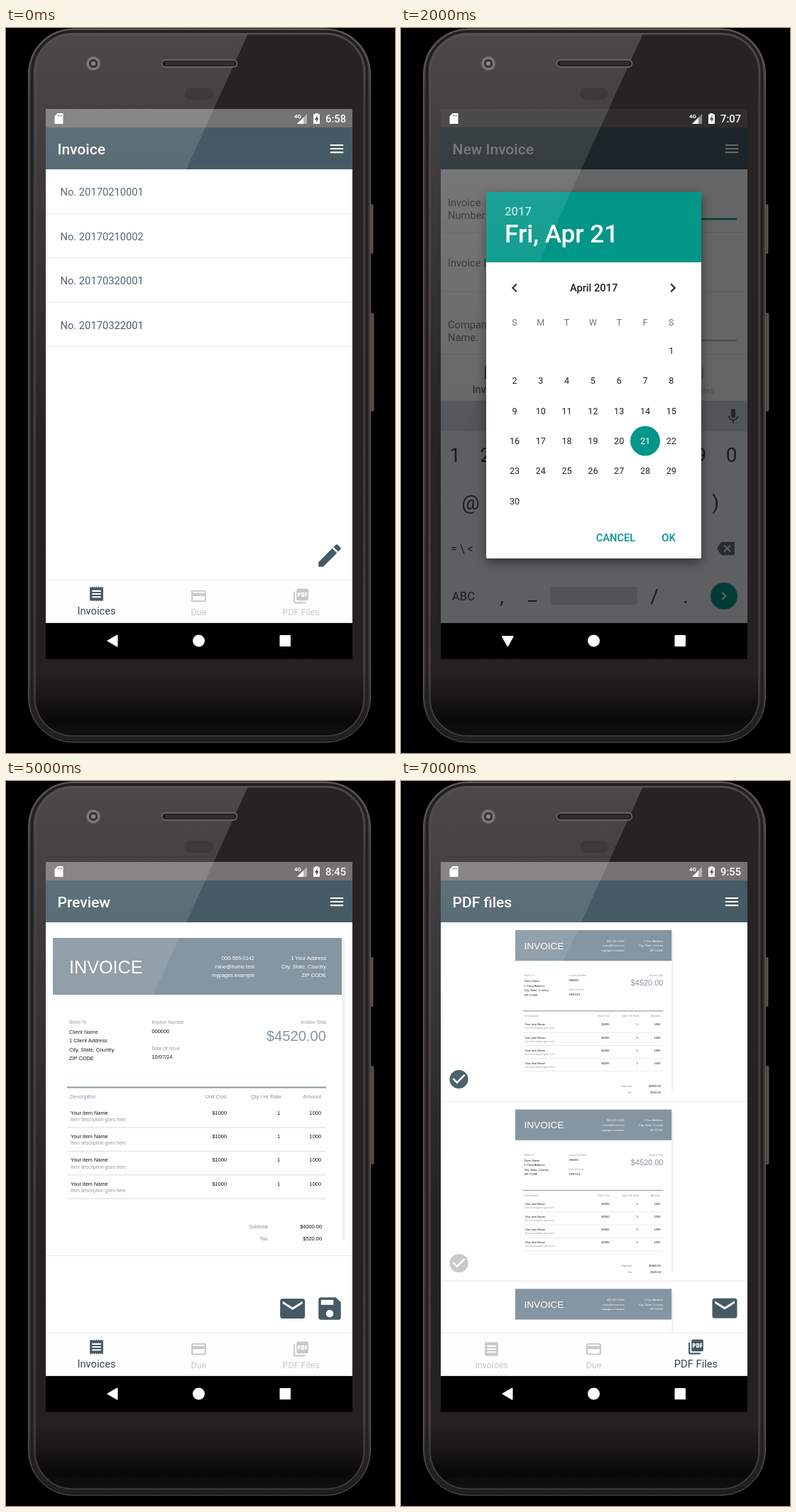
Write an HTML page that moves like this. It is 548 px wide and 1021 px high and loops after 8000 ms.

```html
<!DOCTYPE html>
<html lang="en">
<head>
<meta charset="utf-8">
<title>Invoice app walkthrough</title>
<style>
html, body { margin: 0; width: 100%; height: 100%; overflow: hidden; background: #000; }
svg { display: block; font-family: Roboto, sans-serif; }
.paper { font-family: "Liberation Sans", Arial, sans-serif; }
</style>
</head>
<body>
<svg width="548" height="1021" viewBox="0 0 548 1021">
  <defs>
    <linearGradient id="face" x1="0" y1="0" x2="0" y2="1">
      <stop offset="0" stop-color="#262324"/><stop offset=".91" stop-color="#242122"/>
      <stop offset=".98" stop-color="#0a0909"/><stop offset="1" stop-color="#141212"/>
    </linearGradient>
    <linearGradient id="rim" x1="0" y1="0" x2="0" y2="1">
      <stop offset="0" stop-color="#5d5a58"/><stop offset=".1" stop-color="#3e3b39"/>
      <stop offset=".9" stop-color="#3e3b39"/><stop offset="1" stop-color="#1c1a1a"/>
    </linearGradient>
    <linearGradient id="shine" gradientUnits="userSpaceOnUse" x1="0" y1="8" x2="0" y2="600">
      <stop offset="0" stop-color="#fff" stop-opacity=".17"/>
      <stop offset="1" stop-color="#fff" stop-opacity="0"/>
    </linearGradient>
    <clipPath id="faceClip"><rect x="41" y="9" width="463" height="988" rx="53"/></clipPath>
    <clipPath id="listClip"><rect x="56" y="199" width="432" height="578"/></clipPath>
    <filter id="shadow" x="-20%" y="-20%" width="140%" height="140%">
      <feDropShadow dx="0" dy="6" stdDeviation="8" flood-opacity=".45"/>
    </filter>
  </defs>

  <rect x="511" y="248" width="6.5" height="70" rx="2" fill="#4b4441"/>
  <rect x="511" y="401" width="7.5" height="139" rx="2" fill="#4b4441"/>
  <path d="M516 249v68M517 403v136" stroke="#69605c"/>
  <rect x="31.5" y="1" width="482" height="1005" rx="63" fill="url(#rim)" stroke="#5f5c59"/>
  <rect x="36.5" y="5" width="472" height="996" rx="58" fill="none" stroke="#211f1f" stroke-width="4"/>
  <rect x="41" y="9" width="463" height="988" rx="53" fill="url(#face)" stroke="#454240" stroke-width="1.5"/>
  <rect x="252" y="84" width="40" height="17" rx="8.5" fill="#1b1818"/>
  <g id="screen"></g>
  <path d="M30 9H340.5L41 667H30z" fill="url(#shine)" clip-path="url(#faceClip)" pointer-events="none"/>
  <g id="status"></g>
  <circle cx="123" cy="50" r="10" fill="#757371"/>
  <circle cx="123" cy="50" r="7" fill="#383635" stroke="#9a9896"/>
  <circle cx="123" cy="50" r="3" fill="#8a8886"/>
  <rect x="219.5" y="45" width="106" height="10" rx="5" fill="#1d1b1b" stroke="#777472" stroke-width="1.3"/>
  <path d="M224 48H322M225 50H322M224 52H322" stroke="#625f5d" stroke-dasharray="1.4 1.2"/>
</svg>

<script>
const SLATE = '#455a64', TEAL = '#009688', PALE = '#c9c9c9', LABEL = '#6b6b6b', INK = '#212121', STEEL = '#8595a1';
const BODY = 14.7, VALUE = 18.9;
const ICONS = {
  receipt: 'M18 17H6v-2h12v2zm0-4H6v-2h12v2zm0-4H6V7h12v2zM3 22l1.5-1.5L6 22l1.5-1.5L9 22l1.5-1.5L12 22l1.5-1.5L15 22l1.5-1.5L18 22l1.5-1.5L21 22V2l-1.5 1.5L18 2l-1.5 1.5L15 2l-1.5 1.5L12 2 10.5 3.5 9 2 7.5 3.5 6 2 4.5 3.5 3 2z',
  card: 'M20 4H4a2 2 0 0 0-2 2v12a2 2 0 0 0 2 2h16a2 2 0 0 0 2-2V6a2 2 0 0 0-2-2zm0 14H4v-6h16v6zm0-10H4V6h16v2z',
  pdf: 'M20 2H8a2 2 0 0 0-2 2v12a2 2 0 0 0 2 2h12a2 2 0 0 0 2-2V4a2 2 0 0 0-2-2zm-8.5 7.5A1.5 1.5 0 0 1 10 11H9v2H7.5V7H10a1.5 1.5 0 0 1 1.5 1.5zm5 2A1.5 1.5 0 0 1 15 13h-2.5V7H15a1.5 1.5 0 0 1 1.5 1.5zm4-3H19v1h1.5V11H19v2h-1.5V7h3zM9 9.5h1v-1H9zM4 6H2v14a2 2 0 0 0 2 2h14v-2H4zm10 5.5h1v-3h-1z',
  pencil: 'M3 17.25V21h3.75L17.8 9.94l-3.75-3.75zM20.7 7.04a1 1 0 0 0 0-1.41l-2.34-2.34a1 1 0 0 0-1.41 0l-1.83 1.83 3.75 3.75z',
  menu: 'M3 18h18v-2H3zm0-5h18v-2H3zm0-7v2h18V6z',
  mail: 'M20 4H4a2 2 0 0 0-2 2v12a2 2 0 0 0 2 2h16a2 2 0 0 0 2-2V6a2 2 0 0 0-2-2zm0 4l-8 5-8-5V6l8 5 8-5z',
  save: 'M17 3H5a2 2 0 0 0-2 2v14a2 2 0 0 0 2 2h14a2 2 0 0 0 2-2V7zm-5 16a3 3 0 1 1 0-6 3 3 0 0 1 0 6zm3-10H5V5h10z',
  check: 'M12 2a10 10 0 1 0 0 20 10 10 0 0 0 0-20zm-2 15l-5-5 1.4-1.4 3.6 3.6 7.6-7.6L19 8z',
  left: 'M15.4 7.4L14 6l-6 6 6 6 1.4-1.4-4.6-4.6z',
  right: 'M8.6 7.4L10 6l6 6-6 6-1.4-1.4 4.6-4.6z',
  erase: 'M22 3H7c-.7 0-1.2.35-1.6.9L0 12l5.4 8.1c.4.55.9.9 1.6.9h15a2 2 0 0 0 2-2V5a2 2 0 0 0-2-2zm-3 12.6L17.6 17 14 13.4 10.4 17 9 15.6l3.6-3.6L9 8.4 10.4 7l3.6 3.6L17.6 7 19 8.4 15.4 12z',
  mic: 'M12 14a3 3 0 0 0 3-3V5a3 3 0 0 0-6 0v6a3 3 0 0 0 3 3zm5.3-3a5.3 5.3 0 0 1-10.6 0H5a7 7 0 0 0 6 6.7V21h2v-3.3a7 7 0 0 0 6-6.7z'
};

const rect = (x, y, w, h, fill, extra = '') => `<rect x="${x}" y="${y}" width="${w}" height="${h}" fill="${fill}" ${extra}/>`;
const rule = (y, color = '#e8e8e8', x1 = 56, x2 = 488, h = 1) => rect(x1, y - h / 2, x2 - x1, h, color);
const icon = (name, cx, cy, size, fill) =>
  `<path d="${ICONS[name]}" fill="${fill}" transform="translate(${cx - size / 2} ${cy - size / 2}) scale(${size / 24})"/>`;
const ANCHOR = { l: 'start', m: 'middle', r: 'end' };
const text = (x, y, s, size = BODY, fill = LABEL, align = 'l', weight = 400) =>
  `<text x="${x}" y="${y}" font-size="${size}" fill="${fill}" text-anchor="${ANCHOR[align]}" font-weight="${weight}">${s}</text>`;
const lines = (x, y, gap, list, ...style) => list.map((s, i) => text(x, y + i * gap, s, ...style)).join('');
const times = (n, fn) => Array.from({ length: n }, (_, i) => fn(i)).join('');

const underline = (y, focused) => focused ? rule(y, TEAL, 175, 473, 2.4) : rule(y, '#8f8f8f', 175, 473, 1.2);

function tabs(active, top = 777, shift = 0) {
  const items = [['Invoices', 'receipt'], ['Due', 'card'], ['PDF Files', 'pdf']];
  return rect(56, top + shift, 432, 838 - top, '#fdfdfd') + rule(top + shift + .5, '#ededed') + rule(837 + shift, '#eee', 56, 488, 2) +
    items.map(([name, glyph], i) => {
      const on = i === active, x = 127.5 + 144 * i, color = on ? SLATE : PALE;
      return icon(glyph, x, (on ? 797 : 800) + shift, 25, color) +
        text(x, (on ? 826 : 827) + shift, name, on ? BODY : 12.6, on ? '#37474f' : color, 'm');
    }).join('');
}

function toolbar(title) {
  return rect(56, 114, 432, 26, '#757273') + rect(56, 140, 432, 59, SLATE) +
    text(72.5, 178, title, 21, '#fff', 'l', 500) + icon('menu', 466, 170, 24.5, '#fff');
}

function statusBar(time) {
  return `<path d="M72.500 120H80.500V135H68.500V124.500z" fill="#fff"/>
    <path d="M73.500 122v2.500m2.300-2.500v2.500m2.300-2.500v2.500" stroke="#777"/>
    ${text(406, 127, '4G', 8, '#fff', 'l', 700)}
    <path d="M424 121V135H410z" fill="#fff" opacity=".45"/><path d="M419 126V135H410z" fill="#fff"/>
    <path d="M435.500 120h4v1.500h2.500V135H433V121.500h2.500z" fill="#fff"/>
    <path d="M438.500 123l-3.500 6h2.200v4l3.300-6h-2z" fill="#555"/>
    ${text(479, 133, time, BODY, '#fff', 'r', 500)}`;
}

function navBar(keyboardOpen) {
  const back = keyboardOpen ? 'M143 857H157.500L150.300 870z' : 'M156.500 855.500V870.500L143.500 863z';
  return rect(56, 838, 432, 50.5, '#000') + `<path d="${back}" fill="#fff" stroke="#fff" stroke-width="2" stroke-linejoin="round"/>
    <circle cx="271.500" cy="863" r="8.500" fill="#fff"/>` + rect(385.5, 855, 15.5, 16, '#fff', 'rx="1"');
}

const invoiceList = () => ['20170210001', '20170210002', '20170320001', '20170322001']
  .map((n, i) => text(76.5, 236.3 + 62.4 * i, 'No. ' + n, BODY, SLATE) + rule(261.5 + 62.3 * i)).join('') +
  icon('pencil', 456, 743, 42, SLATE);

const button = (y, label) => rect(56, y, 432, 42.5, SLATE) + text(271.5, y + 27, label, BODY, '#fff', 'm');

function clientForm(dy, focus) {
  return `<g clip-path="url(#listClip)"><g transform="translate(0 ${dy})">` +
    lines(66, 218, 17.5, ['Invoice', 'Number:']) + text(192, 219, '000000', VALUE, INK) + underline(236, focus === 'number') +
    text(66, 302.5, 'Invoice Date:') + text(192, 302.5, '10/07/14') +
    lines(66, 390, 17.5, ['Company', 'Name:']) + text(192, 390, 'Client Name', VALUE, INK) + underline(407) +
    lines(66, 478, 17.5, ['Company', 'Address:']) +
    lines(192, 478.5, 22.2, ['1, Client Address', 'City, State, Country', 'ZIP CODE'], VALUE, INK) + underline(540) +
    text(66, 607, 'Due Date:') + text(192, 607, 'Due Date') +
    text(66, 694, 'Email Address:') + text(192, 694, 'mine@home.test', VALUE, INK) +
    (focus === 'email' ? rect(334, 674, 2, 25, TEAL) : '') + underline(712, focus === 'email') +
    [254.5, 338, 426.5, 559.5, 642.5].map(y => rule(y)).join('') + button(731, 'Next') + '</g></g>';
}

function itemForm() {
  const rows = [['Description:', 'Your item Name'], ['Quantity:', '1'], ['Unit Price:', '$1000'], ['Amount:', '$1000']];
  return rows.map(([label, value], i) => {
    const y = 88.2 * i;
    return text(66, 251 + y, label) + text(192, 251 + y, value, VALUE, INK) + underline(268.5 + y, i === 3) + rule(287.5 + y);
  }).join('') + button(552, 'Save and Preview');
}

function keyboard() {
  const key = (x, y, s, size = 28) => text(x, y, s, size, '#37474f', 'm');
  return rect(56, 525, 432, 43, '#cfd8dc') + rect(56, 568, 432, 270, '#eceff1') + icon('mic', 468, 547, 25, '#546066') +
    times(10, i => key(76 + 43.3 * i, 611, (i + 1) % 10)) + key(98, 678, '@') + key(443, 678, ')') +
    key(86, 739, '= \\ &lt;', 16) + icon('erase', 457.5, 733, 25, '#607078') + key(88, 806, 'ABC', 16.5) +
    key(142, 810, ',') + key(185, 806, '_') + rect(210, 787, 122.5, 25, '#cbd1d4', 'rx="2"') + key(357, 810, '/') + key(401, 810, '.') +
    `<circle cx="455" cy="800" r="19" fill="${TEAL}"/>` + icon('right', 455, 800, 23, '#fff');
}

function datePicker() {
  const colX = i => 160 + 36.8 * i;
  return `<g filter="url(#shadow)">${rect(120, 231, 303, 516, '#fff', 'rx="2"')}</g>` + rect(120, 231, 303, 99, TEAL) +
    text(146, 264, '2017', 16.8, 'rgba(255,255,255,.7)', 'l', 500) + text(146, 302, 'Fri, Apr 21', 35.2, '#fff', 'l', 500) +
    icon('left', 160, 366, 25, INK) + icon('right', 383, 366, 25, INK) + text(271.7, 371, 'April 2017', BODY, INK, 'm', 500) +
    times(7, i => text(colX(i), 418.500, 'SMTWTFS'[i], 12.6, '#757575', 'm')) +
    `<circle cx="344" cy="581.500" r="21" fill="${TEAL}"/>` +
    times(30, i => text(colX((i + 6) % 7), 459 + 42.3 * Math.floor((i + 6) / 7), i + 1, 12.6, i === 20 ? '#fff' : INK, 'm')) +
    text(302.5, 723, 'CANCEL', BODY, TEAL, 'm', 500) + text(377, 723, 'OK', BODY, TEAL, 'm', 500);
}

function invoicePaper() {
  const S = 7.4, TINY = 6.5, GRAY = '#999', BLACK = '#111';
  const right = (x, y, s, color = BLACK) => text(x, y, s, S, color, 'r');
  return '<g class="paper">' + rect(473, 225, 4.5, 421, '#f1f1f1') + rect(66, 221, 407, 80, STEEL) + text(89, 270.5, 'INVOICE', 25.2, '#fff') +
    lines(350, 252, 12.2, ['000-555-0142', 'mine@home.test', 'mypages.example'], S, '#fff', 'r') +
    lines(451, 252, 12.2, ['1 Your Address', 'City, State, Country', 'ZIP CODE'], S, '#fff', 'r') +
    text(89, 341.5, 'Billed To', TINY, GRAY) + text(205.5, 341.5, 'Invoice Number', TINY, GRAY) +
    text(451, 341.5, 'Invoice Total', TINY, GRAY, 'r') + text(451, 366, '$4520.00', 20.2, STEEL, 'r') +
    lines(89, 356.3, 12.1, ['Client Name', '1 Client Address', 'City, State, Country', 'ZIP CODE'], S, BLACK) +
    text(205.5, 355, '000000', S, BLACK) + text(205.5, 378.5, 'Date Of Issue', TINY, GRAY) + text(205.5, 391, '10/07/14', S, BLACK) +
    rule(431.5, STEEL, 86, 451, 2) + text(90, 447, 'Description', S, STEEL) +
    right(311, 447, 'Unit Cost', STEEL) + right(388, 447, 'Qty / Hr Rate', STEEL) + right(444, 447, 'Amount', STEEL) +
    times(4, i => {
      const y = 469.5 + 33.4 * i;
      return text(91, y, 'Your item Name', S, BLACK) + text(91, y + 9.3, 'Item description goes here', 6.6, GRAY) +
        right(311, y, '$1000') + right(386, y, '1') + right(444, y, '1000') + rule(y + 18.4, '#dcdcdc', 86, 451);
    }) +
    right(369, 630, 'Subtotal', STEEL) + right(445, 630, '$4000.00') + right(369, 646.5, 'Tax', STEEL) + right(445, 646.5, '$520.00') + '</g>';
}

const preview = () => invoicePaper() + rule(668.5) + icon('mail', 403.7, 743, 42, SLATE) + icon('save', 456, 743, 42, SLATE);
const toast = () => rect(208, 723, 127, 47, '#666462', 'rx="23.5"') + text(271.5, 752.5, 'Email sent!', BODY, '#fff', 'm');

const pdfList = () => '<g clip-path="url(#listClip)">' +
  times(3, i => `<g transform="translate(161 ${210 + 252.6 * i}) scale(.541) translate(-66 -221)">${invoicePaper()}</g>` +
    rule(451.5 + 252.6 * i)) + '</g>' +
  icon('check', 81.5, 420, 31.5, SLATE) + icon('check', 81.5, 679, 31.5, PALE) + icon('mail', 456, 742.5, 42, SLATE);

const pickDate = () => clientForm(33, 'number') + tabs(0, 777, -312) + keyboard() +
  rect(56, 114, 432, 724, '#000', 'opacity=".6"') + datePicker();

// Each step lasts one second: title, clock, content.
const steps = [
  ['Invoice', '6:58', () => invoiceList() + tabs(0)],
  ['Due', '6:59', () => invoiceList() + tabs(1)],
  ['New Invoice', '7:07', pickDate, true],
  ['New Invoice', '7:10', () => clientForm(0, 'email') + tabs(0, 773)],
  ['New Invoice', '8:28', () => itemForm() + tabs(0)],
  ['Preview', '8:45', () => preview() + tabs(0)],
  ['Preview', '8:46', () => preview() + toast() + tabs(0)],
  ['PDF files', '9:55', () => pdfList() + tabs(2)]
];

const screenLayer = document.getElementById('screen'), statusLayer = document.getElementById('status');
let shown = -1;
function draw() {
  const step = Math.floor(performance.now() / 1000) % steps.length;
  if (step !== shown) {
    const [title, clock, content, keyboardOpen] = steps[shown = step];
    screenLayer.innerHTML = rect(56, 114, 432, 724, '#fefefe') + toolbar(title) + content() + navBar(keyboardOpen);
    statusLayer.innerHTML = statusBar(clock);
  }
  requestAnimationFrame(draw);
}
draw();
</script>
</body>
</html>
```
